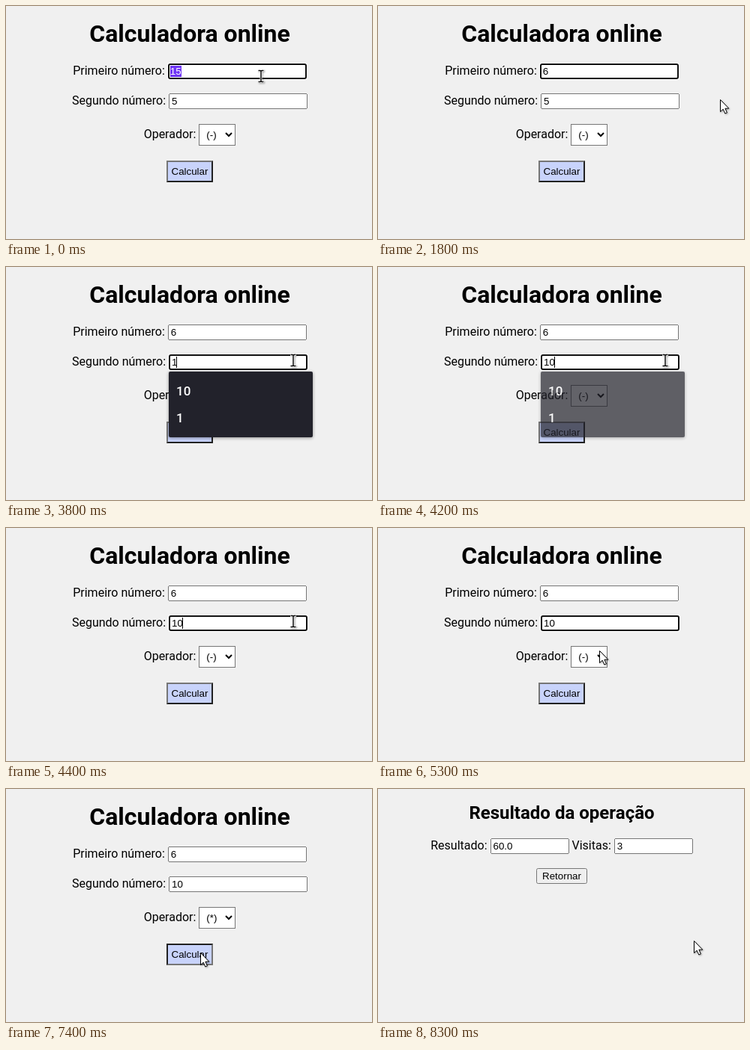
An HTML page that plays this animation: 488 px wide and 312 px high, repeating every 8700 ms.

```html
<!DOCTYPE html>
<html lang="pt">
<head>
<meta charset="utf-8">
<style>
  html, body { margin: 0; width: 100%; height: 100%; overflow: hidden; background: #f0f0f0; }
  body { position: relative; color: #000; font: 16px Roboto, sans-serif; pointer-events: none; }
  [hidden] { display: none !important; }
  .page > * { position: absolute; left: 0; width: 490px; margin: 0; text-align: center; white-space: nowrap; }
  h1 { top: 18px; font-size: 32px; }
  h2 { top: 18px; font-size: 24px; }
  input, select, button, .mark, .menu { box-sizing: border-box; margin: 0; font: 13.3333px "Liberation Sans", Arial, sans-serif; }
  input { width: 185px; height: 21px; }
  #result input { width: 105px; }
  select { width: 49px; height: 29px; padding: 5px; background: #fff; border: 1px solid #767676; border-radius: 0; }
  #calc { width: 62px; height: 29px; padding: 0; background: #c8d3fb; border: 2px outset #767676; color: #000; }
  #calc.pressed { border-style: inset; }
  #back { width: 68px; height: 21px; padding: 0; }
  .focus { outline: -webkit-focus-ring-color auto 1px; }
  .field { position: relative; display: inline-block; }
  .mark, .caret { position: absolute; top: 3px; left: 3px; height: 15px; }
  .mark { line-height: 15px; background: #6f35f5; color: #fff; }
  .caret { width: 1px; background: #000; }
  #suggest, .menu { position: absolute; }
  #suggest { left: 217px; top: 140px; width: 192px; height: 88px; border-radius: 2px; background: #22222b;
    box-shadow: 0 1px 4px #0006; color: #fff; font-size: 17px; font-weight: 500; line-height: 36px; }
  #suggest div { padding-left: 10px; position: relative; top: 8px; }
  .menu { left: 247px; top: 187px; width: 60px; height: 71px; border: 1px solid #b8b8b8; background: #fff;
    box-shadow: 0 1px 4px #0004; line-height: 17.25px; }
  .menu div { padding-left: 19px; }
  .menu .on { background: #6f35f5; color: #fff; }
  #pointer { position: absolute; left: 0; top: 0; overflow: visible; filter: drop-shadow(1px 1px 1px #0005); }
</style>
</head>
<body>
<div class="page" id="form">
  <h1>Calculadora online</h1>
  <div style="top:77px">Primeiro número: <span class="field"><input readonly tabindex="-1"><span class="mark"></span><span class="caret"></span></span></div>
  <div style="top:117px">Segundo número: <span class="field"><input readonly tabindex="-1"><span class="mark"></span><span class="caret"></span></span></div>
  <div style="top:158px">Operador: <select id="op" tabindex="-1"><option>(-)</option><option>(*)</option></select></div>
  <div style="top:207px"><button id="calc" tabindex="-1">Calcular</button></div>
</div>
<div class="page" id="result" hidden>
  <h2>Resultado da operação</h2>
  <div style="top:66px">Resultado: <input readonly value="60.0" tabindex="-1"> Visitas: <input readonly value="3" tabindex="-1"></div>
  <div style="top:106px"><button id="back" tabindex="-1">Retornar</button></div>
</div>
<div id="suggest" hidden><div>10</div><div>1</div></div>
<div class="menu" id="menu" hidden><div>(+)</div><div>(-)</div><div>(*)</div><div>(/)</div></div>
<svg id="pointer" width="20" height="24">
  <path id="arrow" d="M.5.5V16.6L4.2 13.2 6.8 19 9.4 17.9 6.9 12.2H11.8Z" fill="#fff" stroke="#000"/>
  <g id="beam" fill="none">
    <path d="M-4-7.5H-1Q0-7.5 0-6.5Q0-7.5 1-7.5H4M0-7V7M-4 7.5H-1Q0 7.5 0 6.5Q0 7.5 1 7.5H4" stroke="#fff" stroke-width="3"/>
    <path d="M-3.5-7.5H-1Q0-7.5 0-6.5Q0-7.5 1-7.5H3.5M0-7V7M-3.5 7.5H-1Q0 7.5 0 6.5Q0 7.5 1 7.5H3.5" stroke="#000" stroke-width="1.4"/>
  </g>
</svg>
<script>
const LOOP = 8700, TICK = 100;
const $ = id => document.getElementById(id);
const fields = [...document.querySelectorAll('.field')].map(f => {
  const [input, mark, caret] = f.children;
  return { input, mark, caret };
});
const options = [...$('menu').children];

// Pointer stops: time, x, y
const stops = [
  [0, 340, 94], [100, 340, 94], [400, 468, 121], [1500, 468, 121], [1600, 474, 119],
  [1800, 456, 125], [2400, 384, 126], [2500, 384, 126], [2600, 383, 125], [4600, 383, 125],
  [5300, 295, 164], [5500, 295, 164], [6000, 283, 228], [6500, 283, 228],
  [6800, 259, 219], [7600, 259, 219], [8300, 421, 203], [LOOP, 421, 203]
];

const within = (t, from, to) => t >= from && t < to;

function pointerAt(t) {
  const i = stops.findIndex(s => s[0] > t);
  const [t0, x0, y0] = stops[i - 1], [t1, x1, y1] = stops[i];
  const p = (t - t0) / (t1 - t0), e = p * (2 - p);
  return [Math.round(x0 + (x1 - x0) * e), Math.round(y0 + (y1 - y0) * e)];
}

function setField({ input, mark, caret }, value, focused, selected, caretOn) {
  if (input.value !== value) input.value = value;
  input.classList.toggle('focus', focused);
  mark.textContent = selected ? value : '';
  caret.hidden = !caretOn;
  caret.style.left = 3 + Math.round(value.length * 7.415) + 'px';
}

function draw(t) {
  const done = t >= 7700;
  $('form').hidden = done;
  $('result').hidden = !done;

  const lastInput = [4200, 3800, 2400, 1100].find(s => t >= s);
  const blink = t < 5300 && lastInput && Math.floor((t - lastInput) / 500) % 2 === 0;
  const first = t < 2400, second = within(t, 2400, 5400), marked = within(t, 2600, 3800);
  setField(fields[0], t < 1100 ? '15' : '6', first, t < 1100, first && blink);
  setField(fields[1], t < 3800 ? '5' : t < 4200 ? '1' : '10', second, marked, second && !marked && blink);

  $('suggest').hidden = !within(t, 3800, 4400);
  $('suggest').style.opacity = t < 4200 ? 1 : t < 4300 ? .7 : .3;

  const index = t < 6400 ? 0 : 1;
  if ($('op').selectedIndex !== index) $('op').selectedIndex = index;
  $('op').classList.toggle('focus', within(t, 6400, 7400));
  $('calc').classList.toggle('pressed', t >= 7400);

  const [x, y] = pointerAt(t);
  $('menu').hidden = !within(t, 5400, 6400);
  const hover = y < 205 ? 1 : Math.min(3, Math.floor((y - 188) / 17.25));
  options.forEach((o, i) => o.classList.toggle('on', i === hover));

  const overField = !done && within(x, 216, 402) && (within(y, 77, 98) || within(y, 117, 138));
  $('beam').style.display = overField ? '' : 'none';
  $('arrow').style.display = overField ? 'none' : '';
  $('pointer').style.transform = `translate(${x}px, ${y}px)`;
}

const start = performance.now();
function frame() {
  const t = (performance.now() - start) % LOOP;
  draw(Math.floor(t / TICK) * TICK);
  requestAnimationFrame(frame);
}
frame();
</script>
</body>
</html>
```
